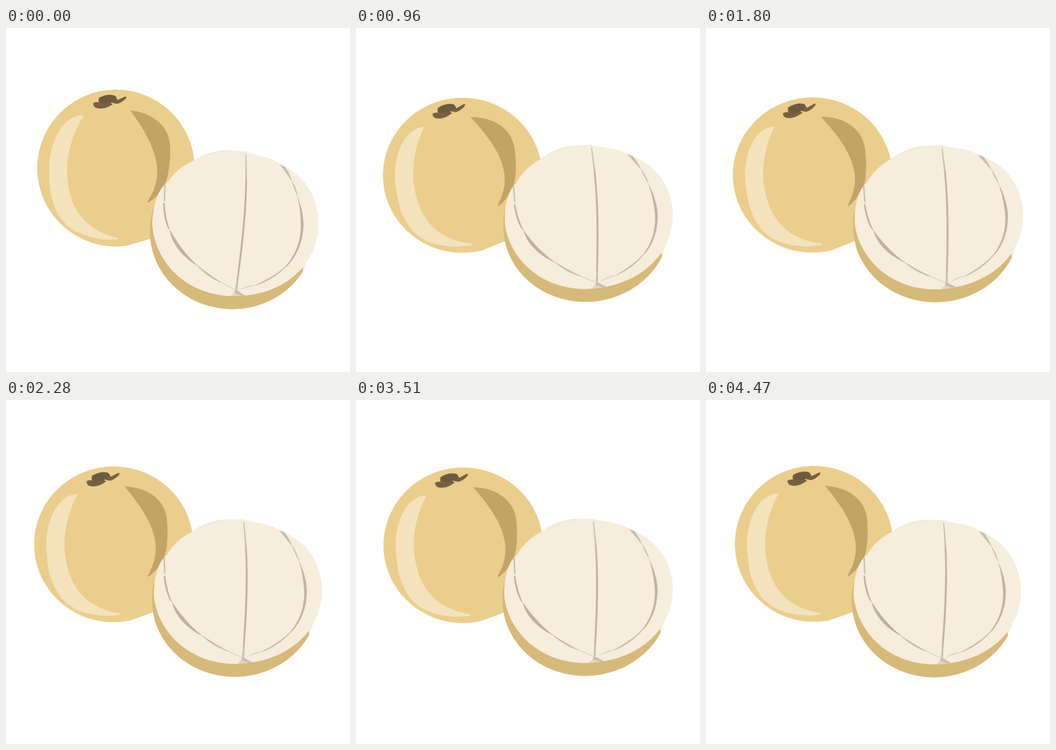
Animation, 748 px wide and 748 px high, one loop 4500 ms. Source, as an HTML page:

```html
<!DOCTYPE html>
<html lang="en">
<head>
<meta charset="utf-8">
<title>Fruit</title>
<style>
html, body { margin: 0; width: 100%; height: 100%; overflow: hidden; background: #fff; }
svg { display: block; width: 100%; height: 100%; }
#fruit { transform-box: view-box; transform-origin: 0 0; }
.dark { fill: #bfb39d; }
.mid { fill: #c9bfac; }
.pale { fill: #e0d7c5; }
</style>
</head>
<body>
<svg viewBox="0 0 748 748">
  <g id="fruit">
    <!-- whole fruit -->
    <path fill="#ebce8b" d="M262 473.500A171 170.500 0 1 1 380 401L314 458.500Z"/>
    <path fill="#f3e2bc" d="M169 190C130 186 94 240 94 310C94 345 97 372 110 398C130 444 185 462 240 460Q247 458 241 456C175 440 133 395 133 308C134 262 150 220 169 190Z"/>
    <path fill="#c2a467" d="M270 179C315 184 357 210 357 262C357 300 352 325 346 339L330 362C324 369 315 377 309 380Q306 379 309 375C322 355 329 335 329 312C328 265 300 220 270 179Z"/>
    <path fill="#776042" d="M190 163Q194 160 203 162L220 158L228 163L232 166L225 170C213 177 198 176 193 172Q189 168 190 163ZM229 162L241 157L257 150Q263 147 261 153C254 160 247 164 240 165Z"/>
    <path fill="#6c5b3e" d="M202 152C214 145 229 143 238 148Q241 152 242 157L229 162C220 165 208 164 201 161Z"/>

    <!-- cut half -->
    <path fill="#d7b978" d="M320 392Q313 415 313 445A179 168 0 0 0 646 529V519L500 560L340 460Z"/>
    <path fill="#f7eddc" d="M346 339C328 357 318 395 318 428C325 515 398 583 495 583C557 583 609 562 645 521L646 528Q653 510 668 484Q680 450 680 427C679 365 650 325 605 301L583 288Q562 279 548 277L525 270Q521 267 516 268L485 266C458 267 433 274 409 288C383 299 363 317 353 334Z"/>
    <path fill="#f0e7d6" d="M408 288C433 273 458 265 485 266L490 268C460 268 432 277 408 288Z"/>

    <!-- segment lines -->
    <path class="mid" d="M520.500 274H522.500L524 326H520.500ZM501.500 548H505L503 569L498 572Z"/>
    <path class="dark" d="M520.500 326H524C524 390 517 465 505 548H501.500C510 480 520 400 520.500 326Z"/>
    <path class="pale" d="M488 582L497 574L512 583H495Z"/>
    <path class="mid" d="M499 568L520 582L512 583L496 575Z"/>
    <path class="mid" d="M344 341L347 340L346 374L345 378L343 374Z"/>
    <path class="dark" d="M342 380H345C346 400 350 422 356 438L354 438C346 424 342 404 342 380ZM356 438C369 462 390 493 418 518C385 500 359 468 356 438Z"/>
    <path class="mid" d="M412 513C436 531 455 545 474 556C450 548 429 533 412 513Z"/>
    <path class="pale" d="M470 553L499 569V571L472 557Z"/>
    <path class="mid" d="M596 297L607 302C614 312 619 322 622 334ZM621 331L623 334C629 345 633 356 635 368C629 356 624 343 621 331Z"/>
    <path class="dark" d="M633 364C642 385 647 410 647 428C646 465 632 497 611 518L605 521C628 497 641 465 641 430C641 410 639 385 633 364Z"/>
    <path class="mid" d="M611 517C590 540 562 556 535 562C560 551 590 535 605 520Z"/>
    <path class="pale" d="M537 561L505 570L522 562L537 558Z"/>
  </g>
</svg>
<script>
const LOOP = 4500;

// turning points of the sway: time, tilt in degrees, widening in percent
const turns = [
  [0, 0, 0],
  [800, 6.9, 1],
  [1380, 3.3, 1.9],
  [1890, 6.2, 1.3],
  [2480, 2.9, 1.1],
  [3270, 2.8, 1.4],
  [3840, 7.4, 1.4],
  [LOOP, 3.3, 0.6]
];

// tilts about the stage centre, flattens with the tilt, widens from x = 294
function pose([time, tilt, wide]) {
  const sx = 1 + wide / 100, sy = 1 - 0.0018 * tilt;
  return {
    offset: time / LOOP,
    easing: "cubic-bezier(.37, 0, .63, 1)",
    transform: `translate(294px, 374px) scale(${sx}, ${sy}) translate(80px, 0px) ` +
      `rotate(${-tilt}deg) translate(-374px, -374px)`
  };
}

document.getElementById("fruit").animate(turns.map(pose), { duration: LOOP, iterations: Infinity });
</script>
</body>
</html>
```
